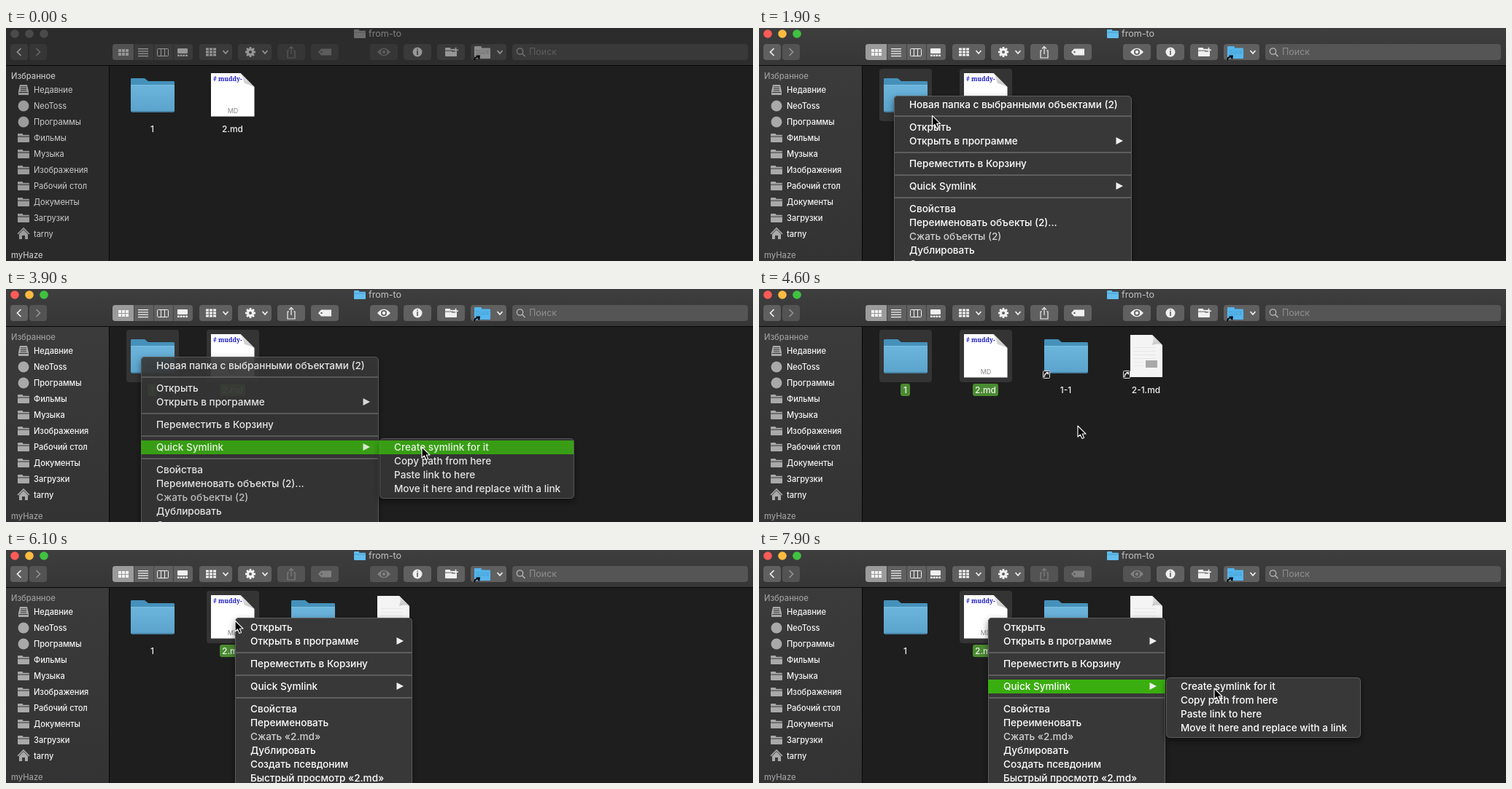
An HTML page with a canvas for the animation above (8000 ms loop, 1024 px wide and 320 px high).

```html
<!DOCTYPE html>
<html lang="ru">
<head>
<meta charset="utf-8">
<title>Quick Symlink</title>
<style>
html, body { margin: 0; width: 100%; height: 100%; overflow: hidden; background: #1e1e1e; }
canvas { display: block; }
</style>
</head>
<body>
<canvas id="stage" width="1024" height="320"></canvas>
<script>
const c = document.getElementById('stage').getContext('2d');
const LOOP = 8000, STEP = 100;
const SANS = 'Inter, "Open Sans", sans-serif';

// Pointer stops: time, x, y
const path = [
  [100, 520, 265], [500, 427, 147], [600, 427, 147], [1000, 184, 97],
  [1700, 184, 97], [2400, 454, 215], [2600, 454, 215], [3400, 570, 217],
  [4300, 570, 217], [4600, 437, 188], [4800, 305.5, 92], [4900, 305.5, 92], [5200, 340, 172],
  [5300, 340, 172], [5700, 314, 97], [6200, 314, 97], [7000, 440, 195],
  [7100, 440, 195], [7900, 624, 190]
];
const presses = [[500, 1100], [1400, 1500], [3600, 3700], [4800, 4800], [5200, 5300], [5700, 5800]];

const subItems = ['Create symlink for it', 'Copy path from here', 'Paste link to here', 'Move it here and replace with a link'];
// An empty string stands for a separator
const menus = [
  { x: 185, w: 326, y: 105, from: 1500, to: 4100, fade: 3800, sub: 2400,
    items: ['Новая папка с выбранными объектами (2)', '', 'Открыть', 'Открыть в программе', '', 'Переместить в Корзину', '',
      'Quick Symlink', '', 'Свойства', 'Переименовать объекты (2)...', 'Сжать объекты (2)', 'Дублировать', 'Создать псевдонимы'] },
  { x: 314, w: 243, y: 106, from: 5900, to: LOOP, fade: LOOP, sub: 7000,
    items: ['Открыть', 'Открыть в программе', '', 'Переместить в Корзину', '', 'Quick Symlink', '',
      'Свойства', 'Переименовать', 'Сжать «2.md»', 'Дублировать', 'Создать псевдоним', 'Быстрый просмотр «2.md»'] }
];
const places = ['Недавние', 'NeoToss', 'Программы', 'Фильмы', 'Музыка', 'Изображения', 'Рабочий стол', 'Документы', 'Загрузки', 'tarny'];

function pointer(t) {
  if (t <= path[0][0]) return { x: path[0][1], y: path[0][2] };
  const i = path.findIndex(p => p[0] >= t);
  if (i < 0) return { x: path.at(-1)[1], y: path.at(-1)[2] };
  const [a, ax, ay] = path[i - 1], [b, bx, by] = path[i];
  const u = (t - a) / (b - a), e = u * u * (3 - 2 * u);
  return { x: ax + (bx - ax) * e, y: ay + (by - ay) * e };
}

function rect(x, y, w, h, fill) {
  c.fillStyle = fill;
  c.fillRect(x, y, w, h);
}

function box(x, y, w, h, r, fill, stroke) {
  c.beginPath();
  c.roundRect(x, y, w, h, r);
  if (fill) { c.fillStyle = fill; c.fill(); }
  if (stroke) { c.strokeStyle = stroke; c.lineWidth = 1; c.stroke(); }
}

function disc(x, y, r, fill) {
  c.beginPath();
  c.arc(x, y, r, 0, 7);
  c.fillStyle = fill;
  c.fill();
}

function text(s, x, y, size, color, weight = 400, align = 'left', family = SANS) {
  c.font = `${weight} ${size}px ${family}`;
  c.textAlign = align;
  c.fillStyle = color;
  c.fillText(s, x, y);
}

function poly(points, fill, stroke, width = 1.5) {
  c.beginPath();
  for (let i = 0; i < points.length; i += 2) c.lineTo(points[i], points[i + 1]);
  if (fill) { c.closePath(); c.fillStyle = fill; c.fill(); }
  if (stroke) { c.strokeStyle = stroke; c.lineWidth = width; c.stroke(); }
}

function gradient(y, h, top, bottom) {
  const g = c.createLinearGradient(0, y, 0, y + h);
  g.addColorStop(0, top);
  g.addColorStop(1, bottom);
  return g;
}

function smallFolder(x, y, w, h, color, line) {
  box(x, y, w * 0.45, h * 0.5, 1, color);
  box(x, y + h * 0.14, w, h * 0.86, 1, color);
  rect(x, y + h * 0.3, w, 1, line);
}

function bigFolder(x) {
  poly([x + 1, 69, x + 19, 69, x + 24, 73, x + 59, 73, x + 60, 74, x + 60, 90, x, 90, x, 70], '#4591bb');
  box(x, 78, 60, 37.5, 2, gradient(78, 37, '#6cb5dc', '#5ba3cc'));
  rect(x, 78, 60, 1, '#7cbfe2');
  rect(x + 1, 114, 58, 1.5, '#4986a9');
}

// "lift" sets how far the folded corner reaches into the sheet
function page(x, y, w, h, fold, lift, color) {
  const r = x + w, fx = r - fold * lift, fy = y + fold * lift;
  poly([x, y, r - fold, y, r, y + fold, r, y + h, x, y + h], color);
  c.beginPath();
  c.moveTo(r - fold, y);
  c.quadraticCurveTo(r - fold * 0.8, y + fold * 0.4, fx, fy);
  c.quadraticCurveTo(r - fold * 0.4, y + fold * 0.8, r, y + fold);
  c.fillStyle = gradient(y, fold, '#e9e9e9', '#c4c4c4');
  c.fill();
}

function linkBadge(x, y) {
  box(x + 0.5, y + 0.5, 9, 10, 1, '#222', '#ddd');
  poly([x + 2, y + 9, x + 3, y + 5, x + 7, y + 3], null, '#fff', 1.3);
  poly([x + 4, y + 2, x + 8, y + 2, x + 8, y + 6], '#fff');
}

function chevron(x, y, dx, dy, color) {
  const p = dx ? [x - dx, y - 5, x + dx, y, x - dx, y + 5] : [x - 3.5, y - dy, x, y + dy, x + 3.5, y - dy];
  poly(p, null, color, 1.7);
}

function drawToolbar(on, canShare) {
  rect(0, 0, 1024, 51, on ? gradient(0, 51, '#3e3e3f', '#363637') : '#2c2c2d');
  ['#fc5b57', '#fdbc40', '#3fc240'].forEach((k, i) => disc(12 + 20 * i, 8, 5.8, on ? k : '#4a4a4a'));
  smallFolder(477, 2, 16, 12, on ? '#62bdec' : '#6d6d6d', on ? '#4a9dcc' : '#5a5a5a');
  text('from-to', 497, 8.5, 12.6, on ? '#c4c4c4' : '#808080');

  const face = on ? '#606061' : '#3a3a3b', ink = on ? '#f0f0f0' : '#969696';
  const offFace = on ? '#535354' : '#363637', offInk = on ? '#808080' : '#5c5c5c';
  const shareFace = canShare ? face : offFace, shareInk = canShare ? ink : offInk;
  const button = (x, w, fill = face) => box(x, 22, w, 22, 4, fill);

  button(6, 24);
  chevron(18, 33, -2.5, 0, ink);
  button(32, 24, offFace);
  chevron(44, 33, 2.5, 0, on ? '#929292' : '#666');

  button(146, 110);
  box(146, 22, 29, 22, [4, 0, 0, 4], on ? '#9b9b9c' : '#525253');
  for (const x of [175, 202, 229]) rect(x, 22, 1, 22, on ? '#444' : '#2c2c2c');
  for (let i = 0; i < 6; i++) rect(154 + i % 3 * 5, 29 + (i / 3 | 0) * 5, 4, 4, ink);
  for (let i = 0; i < 4; i++) rect(181, 28 + i * 3.3, 14, 1.3, ink);
  box(207.5, 28.5, 15, 10, 1, null, ink);
  rect(212, 28, 1, 11, ink);
  rect(217, 28, 1, 11, ink);
  box(235, 28, 14, 7, 1, ink);
  for (let i = 0; i < 4; i++) rect(235 + i * 3.7, 36.5, 2.8, 2.5, ink);

  button(265, 45);
  for (let i = 0; i < 9; i++) rect(274 + i % 3 * 5, 27.5 + (i / 3 | 0) * 4, 4, 3, ink);
  chevron(301, 33, 0, 2, ink);

  button(318, 46);
  c.save();
  c.translate(335, 33);
  for (let i = 0; i < 8; i++) { c.rotate(Math.PI / 4); rect(-1.4, -7, 2.8, 4, ink); }
  c.restore();
  disc(335, 33, 5.2, ink);
  disc(335, 33, 2, face);
  chevron(355, 33, 0, 2, ink);

  button(372, 38, shareFace);
  poly([388, 31, 386, 31, 386, 41, 396, 41, 396, 31, 394, 31], null, shareInk, 1.2);
  poly([391, 36, 391, 25.5], null, shareInk, 1.2);
  poly([388, 28.5, 391, 25.5, 394, 28.5], null, shareInk, 1.2);

  button(418, 38, shareFace);
  poly([428, 33, 432, 28.5, 446, 28.5, 446, 37.5, 432, 37.5], shareInk);
  disc(432.5, 33, 1.2, shareFace);

  button(499, 38, shareFace);
  c.beginPath();
  c.moveTo(509, 33);
  c.quadraticCurveTo(518, 22.5, 527, 33);
  c.quadraticCurveTo(518, 43.5, 509, 33);
  c.fillStyle = shareInk;
  c.fill();
  disc(518, 33, 4, shareFace);
  disc(518, 33, 2.2, shareInk);

  button(545, 38);
  disc(564, 33, 6.5, ink);
  text('i', 564, 33.5, 11, face, 700, 'center');

  button(591, 38);
  smallFolder(602, 27, 16, 12, ink, face);
  rect(613, 29.5, 7, 1.5, ink);
  rect(615.8, 26.7, 1.5, 7, ink);
  poly([611, 32, 616, 32], null, face, 1);

  button(637, 49);
  smallFolder(642, 25, 22, 17, on ? '#55b6ed' : '#8b8b8b', on ? '#4dabe2' : '#7c7c7c');
  text('Quick', 653.5, 34.5, 6.5, on ? '#459fd2' : '#707070', 500, 'center');
  poly([642, 44, 643, 41, 647, 39], null, '#000', 1.8);
  poly([644, 37.5, 650, 37.5, 649, 43.5], '#000');
  chevron(677, 33, 0, 2, ink);

  box(694, 22, 323, 22, 4, on ? '#555556' : '#39393a');
  c.beginPath();
  c.arc(704.5, 32, 4.2, 0, 7);
  c.strokeStyle = on ? '#b8b8b8' : '#777';
  c.lineWidth = 1.3;
  c.stroke();
  poly([707.5, 35, 711.5, 39], null, on ? '#b8b8b8' : '#777', 1.4);
  text('Поиск', 717, 33.5, 12.5, on ? '#8f8f8f' : '#5d5d5d');
  rect(0, 51, 1024, 1, '#080808');
}

function drawSidebar(on) {
  rect(0, 52, 141, 268, on ? gradient(52, 268, '#3b3b3b', '#333334') : '#2a2a2b');
  rect(141, 52, 1, 268, '#080808');
  const ink = on ? '#a9a9a9' : '#9b9b9b', back = on ? '#383838' : '#2a2a2b';
  const head = on ? '#9c9c9c' : '#c2c2c2';
  text('Избранное', 7, 66.5, 11.2, head, 500);
  text('myHaze', 7, 312.5, 11.2, head, 500);
  places.forEach((name, i) => {
    const y = 85 + i * 22;
    text(name, 38, y + 0.5, 11.05, on ? '#f6f6f6' : '#cdcdcd', on ? 500 : 400);
    if (i === 0) {
      poly([19, y - 7, 29, y - 7, 31, y + 2, 31, y + 7, 17, y + 7, 17, y + 2], ink);
      for (const d of [-4.5, -2, 0.5]) rect(20, y + d, 8, 1, back);
      rect(18, y + 3, 12, 1, back);
    } else if (i < 3) {
      disc(24, y, 7.5, ink);
    } else if (i < 9) {
      smallFolder(16, y - 6, 16, 12, ink, back);
    } else {
      poly([16, y, 24, y - 8, 32, y], null, ink, 1.6);
      poly([18, y, 24, y - 6, 30, y, 30, y + 7, 18, y + 7], ink);
      rect(22, y + 2, 4, 5, back);
    }
  });
}

function label(name, x, w, selected) {
  if (selected) box(x - w / 2, 130, w, 17, 3, '#4a8b31');
  text(name, x, 139, 11.9, '#f0f0f0', 500, 'center');
}

function drawFiles(first, second, links) {
  if (first) box(165, 56, 72, 72, 4, '#343434');
  if (second) box(275, 56, 72, 72, 4, '#343434');
  bigFolder(171);
  label('1', 200.5, 13, first);
  page(281, 62, 59.5, 59.5, 19, 0.72, '#fff');
  text('# muddy-', 284, 70.5, 8.5, '#1c1cc8', 700, 'left', '"Noto Serif", "DejaVu Serif", serif');
  text('MD', 311, 114.5, 9, '#8a8a8a', 400, 'center');
  label('2.md', 310.5, 35, second);
  if (!links) return;
  bigFolder(391);
  linkBadge(389, 112);
  label('1-1', 420.5);
  page(509, 63, 44, 58, 14, 1, '#f4f4f4');
  for (let i = 0; i < 6; i++) rect(514, 80 + i * 5, i < 4 ? 30 : 13, 1, '#e6e6e6');
  rect(530, 98, 16, 10, '#a9a9a9');
  linkBadge(499, 112);
  label('2-1.md', 530.5);
}

function panel(x, y, w, h) {
  c.save();
  c.shadowColor = 'rgba(0,0,0,.5)';
  c.shadowBlur = 10;
  c.shadowOffsetY = 4;
  box(x, y, w, h, 5, '#383838');
  c.restore();
  box(x + 0.5, y + 0.5, w - 1, h - 1, 5, null, '#5c5c5c');
}

function drawRow(s, x, y, w, lit) {
  if (lit) rect(x, y - 9, w, 19, '#3aad10');
  text(s, x + 21, y + 0.5, 13.55, s.startsWith('Сжать') ? '#d0d0d0' : '#fff', 500);
}

function drawMenu(m, t) {
  if (t < m.from || t >= m.to) return;
  const p = pointer(t), late = pointer(t - 400);
  const subOpen = t >= m.sub, subX = m.x + m.w;
  c.save();
  if (t > m.fade) c.globalAlpha = Math.max(0, 1 - (t - m.fade) / 800);
  panel(m.x, 93, m.w, 240);
  let y = m.y, subY;
  for (const s of m.items) {
    if (!s) {
      rect(m.x + 1, y - 4, m.w - 2, 2, '#5e5e5e');
      y += 12;
      continue;
    }
    const isLink = s === 'Quick Symlink';
    const over = p.x > m.x + 3 && p.x < subX && p.y >= y - 9 && p.y < y + 10;
    drawRow(s, m.x, y, m.w, subOpen ? isLink : over);
    if (isLink || s === 'Открыть в программе') {
      poly([subX - 21.5, y - 5, subX - 12, y, subX - 21.5, y + 5], '#f0f0f0');
    }
    if (isLink) subY = y;
    y += 19;
  }
  if (subOpen) {
    panel(subX + 1, subY - 12, 267, 83);
    // The submenu highlight trails the pointer and blinks on click
    const lit = late.x > subX && t !== 3700;
    subItems.forEach((s, i) => drawRow(s, subX, subY + 19 * i, 267, lit && i === 0));
  }
  c.restore();
}

function drawPointer(t) {
  if (t < 100) return;
  const { x, y } = pointer(t);
  if (presses.some(([a, b]) => t >= a && t <= b)) {
    c.beginPath();
    c.arc(x, y, 20.3, 0, 7);
    c.strokeStyle = '#000';
    c.lineWidth = 3.4;
    c.stroke();
    c.strokeStyle = '#fff';
    c.lineWidth = 1.4;
    c.stroke();
  }
  c.save();
  c.translate(x, y);
  c.lineJoin = 'round';
  poly([0, 0, 0, 15, 3.4, 12, 6, 17.5, 8.6, 16.3, 6.2, 11, 11, 11, 0, 0], '#000', '#f4f4f4', 1.2);
  c.restore();
}

function draw(t) {
  const on = t >= 500;
  const reach = pointer(Math.min(t, 1100)).x;
  const held = t >= 600 && t < 5300;
  c.textBaseline = 'middle';
  rect(0, 0, 1024, 320, '#1e1e1e');
  drawFiles(held && reach < 231, held && reach < 341 || t >= 5700, t >= 4100);
  if (t >= 600 && t <= 1100) {
    const p = pointer(t);
    rect(p.x, p.y, 427 - p.x, 147 - p.y, 'rgba(255,255,255,.115)');
    c.strokeStyle = 'rgba(255,255,255,.3)';
    c.lineWidth = 1;
    c.strokeRect(p.x + 0.5, p.y + 0.5, 426 - p.x, 146 - p.y);
  }
  drawToolbar(on, t >= 1300 && t < 5300);
  drawSidebar(on);
  menus.forEach(m => drawMenu(m, t));
  drawPointer(t);
}

let start;
function tick(now) {
  start ??= now;
  draw(Math.floor((now - start) % LOOP / STEP) * STEP);
  requestAnimationFrame(tick);
}
requestAnimationFrame(tick);
</script>
</body>
</html>
```
